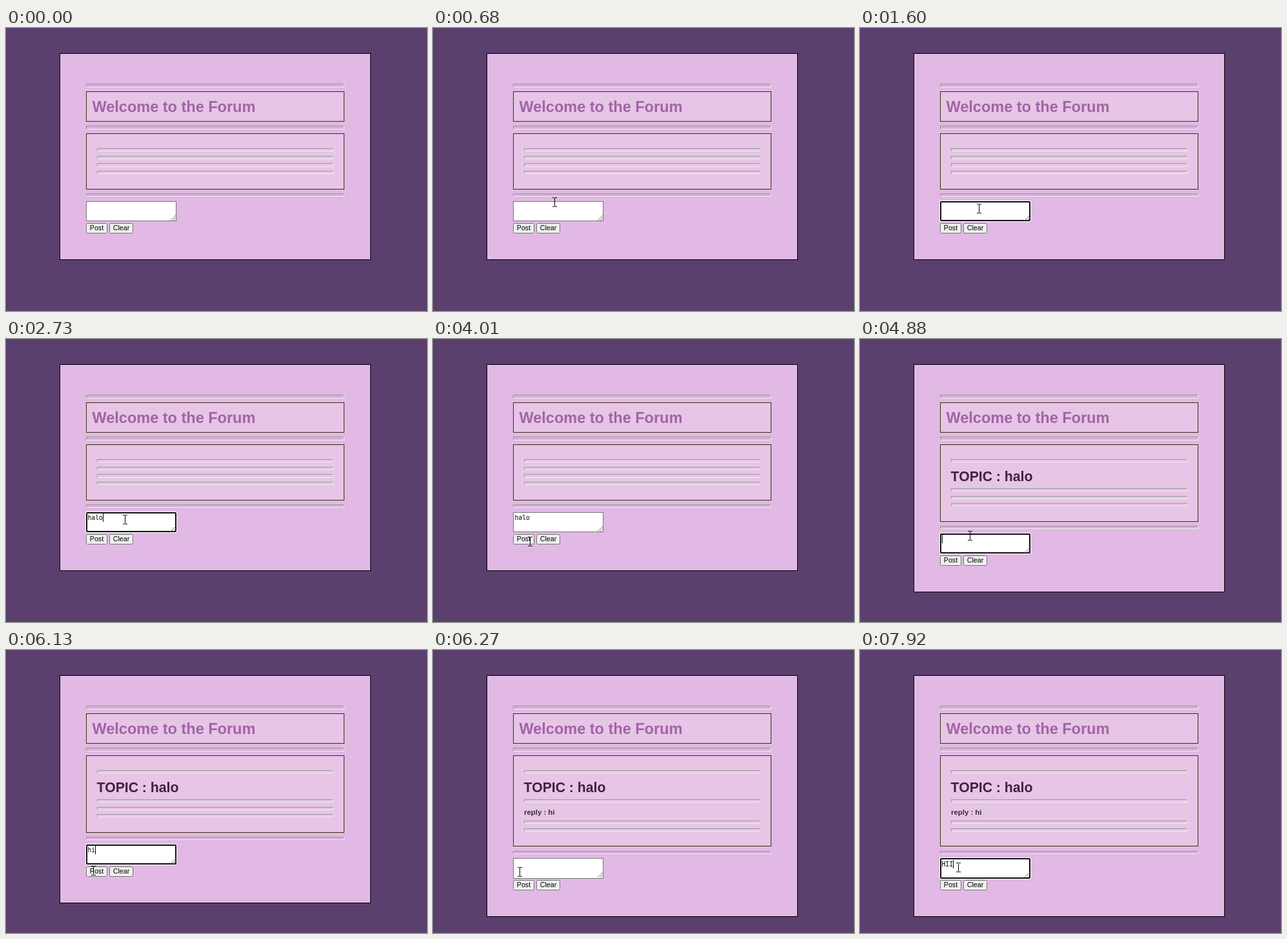
These frames come from a looping animation (652x438 px, 8000 ms). An HTML page:

```html
<!DOCTYPE html>
<html lang="en">
<head>
<meta charset="utf-8">
<title>Forum</title>
<style>
  html, body { margin: 0; width: 100%; height: 100%; overflow: hidden; background: #5b3f6e; }
  body, body * { box-sizing: border-box; }
  body > *, #stage div, #stage svg { position: absolute; }
  #stage { left: 0; top: 0; width: 652px; height: 438px; overflow: hidden; font-family: "Liberation Sans", Arial, sans-serif; }
  .strip { left: 0; top: 435px; width: 652px; height: 3px; background: #5a4467; }
  #panel { left: 83px; top: 39px; width: 482px; border: 1px solid #000; background: #e1b9e4; }
  .box { left: 124px; width: 400px; border: 1px solid #3b2f0c; background: #e6c5e6; }
  .hr { height: 5.2px; border: 1px solid; border-color: #9a9a9a #eee #eee #9a9a9a; }
  .wide { left: 124px; width: 400px; background: rgba(0, 0, 0, .05); }
  .thin { left: 141px; width: 366px; }
  .text { white-space: pre; font-weight: bold; }
  #title { left: 133.5px; top: 109px; font-size: 23.5px; line-height: 26px; color: #a263a7; }
  #topic { left: 140.6px; top: 201px; font-size: 21.2px; line-height: 23px; color: #40223f; }
  #reply { left: 141px; top: 245px; font-size: 11.4px; line-height: 12px; color: #3a2c3a; }
  #form { left: 124px; width: 140px; height: 60px; }
  #area { left: 0; top: 0; width: 140px; height: 31.2px; border: 1px solid #767676; background: #fff; }
  #area.focus { border: 2px solid #101010; border-radius: 2px; box-shadow: 0 0 0 1px #fff; }
  #grip { left: 131px; top: 22px; fill: none; stroke: #777; stroke-width: 1; }
  #typed { left: 2.4px; top: 3.2px; font: 9.75px/11px "DejaVu Sans Mono", monospace; color: #000; white-space: pre; }
  #caret { top: 2.4px; width: 1px; height: 13px; background: #000; }
  .btn { top: 34.1px; height: 15.7px; border: 1px solid #767676; border-radius: 2.5px; background: #efefef;
         font-size: 10.67px; line-height: 13px; text-align: center; color: #000; }
  #cursor { width: 7px; height: 15px; }
</style>
</head>
<body>
<div id="stage">
  <div class="strip"></div>
  <div id="panel"></div>
  <div class="hr wide" style="top:86.4px"></div>
  <div class="box" style="top:98px;height:47px"></div>
  <div class="text" id="title">Welcome to the Forum</div>
  <div class="hr wide" style="top:151.4px"></div>
  <div class="box" id="thread" style="top:163px"></div>
  <div class="hr thin"></div>
  <div class="hr thin"></div>
  <div class="hr thin"></div>
  <div class="hr thin"></div>
  <div class="text" id="topic">TOPIC : halo</div>
  <div class="text" id="reply">reply : hi</div>
  <div class="hr wide" id="rule"></div>
  <div id="form">
    <div id="area"></div>
    <svg id="grip" width="8" height="8"><path d="M0 8L8 0M4 8L8 4"/></svg>
    <div id="typed"></div>
    <div id="caret"></div>
    <div class="btn" style="left:0;width:33px">Post</div>
    <div class="btn" style="left:36px;width:37px">Clear</div>
  </div>
  <svg id="cursor" viewBox="0 0 7 15" shape-rendering="crispEdges">
    <path d="M0 0h3v1H0zM4 0h3v1H4zM3 1h1v13H3zM0 14h3v1H0zM4 14h3v1H4z"/>
  </svg>
</div>
<script>
  const $ = id => document.getElementById(id);
  const px = v => v + 'px';
  const LOOP = 8000, BLINK = 500, ADVANCE = 5.87;
  const TOPIC_H = 33.3, REPLY_H = 21.3;
  const TOPIC_AT = 4070, REPLY_AT = 6210;

  // [time, text, focused, blink start if not the same time]
  const input = [
    [0, '', false],
    [1100, '', true], [2120, 'h', true], [2330, 'ha', true], [2540, 'hal', true], [2730, 'halo', true, 2710],
    [3950, 'halo', false], [TOPIC_AT, '', false],
    [4780, '', true], [5420, 'h', true], [5760, 'hi', true],
    [6140, 'hi', false], [REPLY_AT, '', false],
    [6680, '', true], [7590, 'H', true], [7790, 'HI', true], [7920, 'HII', true]
  ];

  // Pointer strokes: begin, end, steps, then start, control and end points
  const moves = [
    [130, 860, 12, [573, 423], [200, 200], [184, 279]],
    [3420, 3890, 8, [184, 279], [168, 298], [150, 313]],
    [4410, 4720, 5, [150, 313], [160, 293], [170, 304]],
    [5820, 6140, 6, [170, 304], [148, 320], [134, 343]],
    [6390, 6530, 3, [134, 343], [142, 336], [152, 336]]
  ];

  const last = (list, t) => list.filter(e => e[0] <= t).pop();
  const rules = document.querySelectorAll('.thin');

  function layout(t) {
    const a = t >= TOPIC_AT ? TOPIC_H : 0;
    const b = t >= REPLY_AT ? REPLY_H : 0;
    const shift = a + b;
    rules.forEach((r, i) => {
      r.style.top = px(186.2 + 11.6 * i + (i > 0 ? a : 0) + (i > 1 ? b : 0));
    });
    $('topic').hidden = !a;
    $('reply').hidden = !b;
    $('thread').style.height = px(86.6 + shift);
    $('panel').style.height = px(319.6 + shift);
    $('rule').style.top = px(256 + shift);
    $('form').style.top = px(267.8 + shift);
  }

  function type(t) {
    const [at, text, focused, anchor = at] = last(input, t);
    $('area').className = focused ? 'focus' : '';
    $('typed').textContent = text;
    const on = focused && Math.floor((t - anchor) / BLINK) % 2 === 0;
    $('caret').style.left = px(Math.floor(3 + ADVANCE * text.length));
    $('caret').style.visibility = on ? 'visible' : 'hidden';
  }

  function point(t) {
    const move = last(moves, t);
    $('cursor').style.visibility = move ? 'visible' : 'hidden';
    if (!move) return;
    const [t0, t1, n, from, via, to] = move;
    const step = Math.floor(Math.min(1, (t - t0) / (t1 - t0)) * (n - 1)) / (n - 1);
    const p = step * (2 - step), q = 1 - p;
    const [x, y] = [0, 1].map(i => Math.round(q * q * from[i] + 2 * p * q * via[i] + p * p * to[i]));
    $('cursor').style.left = px(x - 3);
    $('cursor').style.top = px(y - 7);
  }

  const start = performance.now();
  function frame() {
    const t = (performance.now() - start) % LOOP;
    layout(t);
    type(t);
    point(t);
    requestAnimationFrame(frame);
  }
  frame();
</script>
</body>
</html>
```
